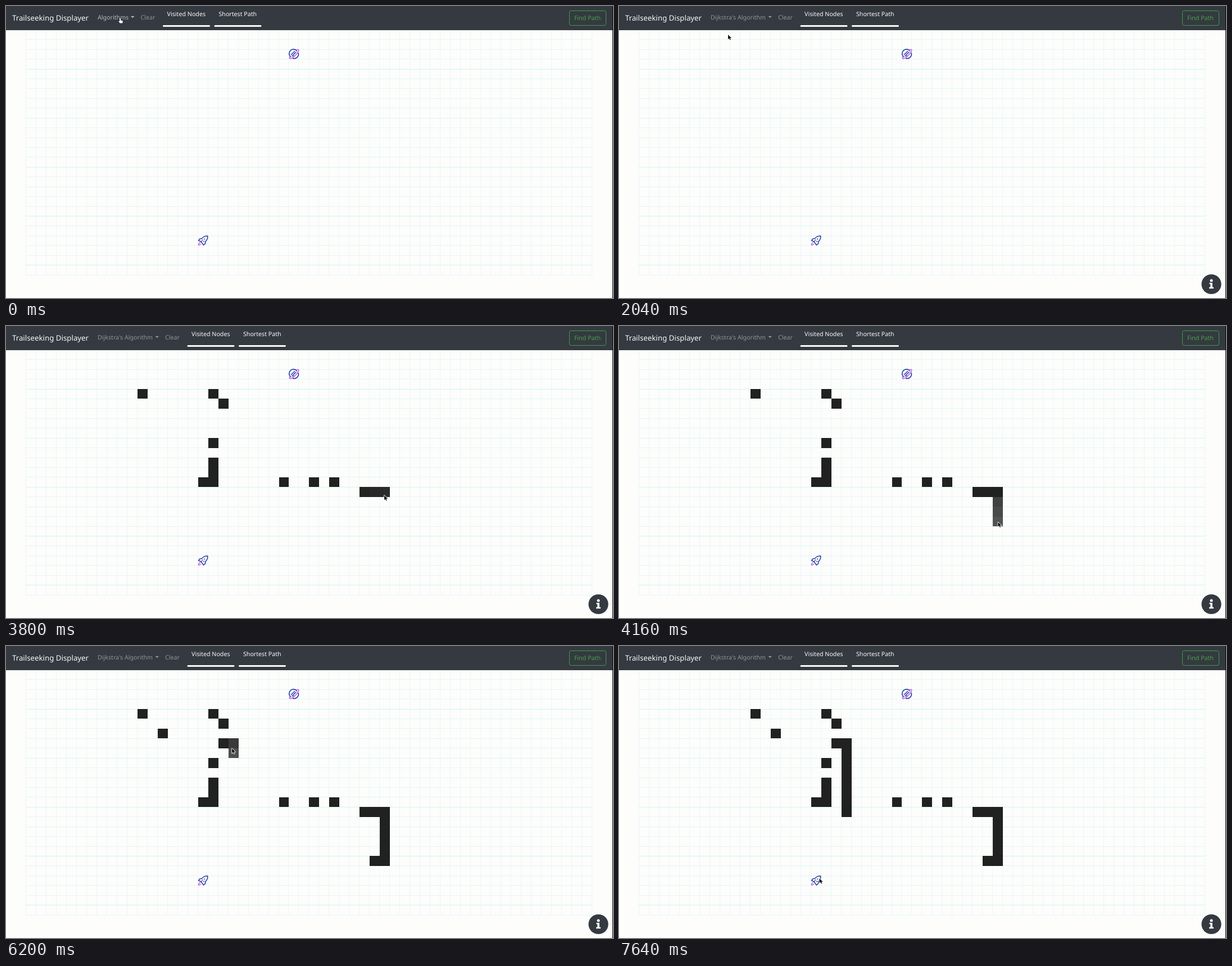
These frames come from a looping animation (1080 by 519 pixels, 8000 ms). An HTML page with a canvas:

```html
<!DOCTYPE html>
<html lang="en">
<head>
<meta charset="utf-8">
<title>Trailseeking Displayer</title>
<style>
  html, body { margin: 0; width: 100%; height: 100%; overflow: hidden; background: #fdfdfc; }
  canvas { display: block; }
</style>
</head>
<body>
<canvas id="stage" width="1080" height="519"></canvas>
<script>
const ctx = document.getElementById('stage').getContext('2d');
const LOOP = 8000;
const FONT = '"Noto Sans", sans-serif';
const COLS = 56, ROWS = 25;
const OPEN = 420, CHOOSE = 1520, INFO = 1640, RELEASE = 4640;
const FADE = 500, GLIDE = 140;
const BLUE = '#2b3fa6', PINK = '#cf5fe6';

const cellX = c => 36 + c * 17.98;
const cellY = r => 42.3 + r * 17.43;
const mix = (a, b, k) => a + (b - a) * k;
const ease = k => k * k * (3 - 2 * k);

// Cells on a straight line, both ends included
function line(c0, r0, c1, r1) {
  const n = Math.max(Math.abs(c1 - c0), Math.abs(r1 - r0));
  return Array.from({ length: n + 1 }, (_, i) => [mix(c0, c1, i / n), mix(r0, r1, i / n)]);
}

// The pointer arrives, draws its cells evenly from start to end, then rests at (x, y)
const moves = [
  { arrive: 0, x: 203, y: 22 },
  { arrive: 1200, x: 194, y: 51 },
  { arrive: 2200, end: 2600, x: 362, y: 250,
    cells: [[11, 4], [18, 4], [19, 5], [18, 9], [18, 11]] },
  { arrive: 3140, end: 3400, x: 673, y: 301,
    cells: [...line(18, 12, 18, 13), [17, 13], [25, 13], [28, 13], [30, 13], ...line(33, 14, 35, 14)] },
  { arrive: 3980, end: 4400, x: 664, y: 380, cells: [...line(35, 15, 35, 19), [34, 19]] },
  { arrive: 4780, x: 288, y: 156 },
  { arrive: 5500, end: 6160, x: 402, y: 182, cells: [[13, 6], [19, 7], [20, 7], [20, 8]] },
  { arrive: 6400, end: 6900, x: 404, y: 295, cells: line(20, 9, 20, 14) },
  { arrive: 7600, x: 356.5, y: 413 }
];

const walls = [], keys = [];
for (const { arrive, end, x, y, cells } of moves) {
  const last = keys[keys.length - 1];
  if (last) keys.push({ ...last, t: arrive - GLIDE });
  if (!cells) {
    keys.push({ x, y, t: arrive });
    continue;
  }
  cells.forEach(([c, r], i) => {
    const t = mix(arrive, end, i / (cells.length - 1));
    walls.push({ c, r, t });
    keys.push({ x: cellX(c + .5), y: cellY(r + .5), t });
  });
  keys.push({ x, y, t: end + 30 });
}

function pointerAt(t) {
  const i = keys.findIndex(p => p.t > t);
  if (i < 1) return keys[keys.length - 1];
  const a = keys[i - 1], b = keys[i];
  const k = ease((t - a.t) / (b.t - a.t));
  return { x: mix(a.x, b.x, k), y: mix(a.y, b.y, k) };
}

function text(s, x, y, color, size = 10.66, align = 'left') {
  ctx.font = `${size}px ${FONT}`;
  ctx.textRendering = 'geometricPrecision';
  ctx.textAlign = align;
  ctx.fillStyle = color;
  ctx.fillText(s, x, y);
}

function rect(x, y, w, h, color) {
  ctx.fillStyle = color;
  ctx.fillRect(x, y, w, h);
}

function round(x, y, w, h, r) {
  ctx.beginPath();
  ctx.roundRect(x, y, w, h, r);
}

function disc(x, y, r, color) {
  ctx.fillStyle = color;
  ctx.beginPath();
  ctx.arc(x, y, r, 0, Math.PI * 2);
  ctx.fill();
}

function stroke(d, color, width) {
  ctx.strokeStyle = color;
  ctx.lineWidth = width;
  ctx.stroke(new Path2D(d));
}

function at(x, y, paint) {
  ctx.save();
  ctx.translate(x, y);
  ctx.lineCap = ctx.lineJoin = 'round';
  paint();
  ctx.restore();
}

function drawGrid() {
  for (let c = 0; c <= COLS; c++) {
    rect(Math.floor(cellX(c) - .5), 43, 1, 435, '#e9f7fb');
  }
  for (let r = 1; r <= ROWS; r++) {
    rect(35, Math.floor(cellY(r)), 1008, 1, r % 5 === 4 ? '#d3f6e6' : '#e3f7f5');
  }
}

function drawWalls(t) {
  for (const { c, r, t: start } of walls) {
    if (t < start) continue;
    const v = Math.round(mix(82, 32, Math.min(1, (t - start) / FADE)));
    const x = Math.round(cellX(c)), y = Math.round(cellY(r));
    rect(x, y, Math.round(cellX(c + 1)) - x, Math.round(cellY(r + 1)) - y, `rgb(${v},${v + 1},${v})`);
  }
}

function drawPlanet() {
  stroke('M5-6A7.8 7.8 0 1 0-6 5M7.6-2A7.8 7.8 0 0 1-2 7.6', BLUE, 1.7);
  stroke('M-5 1L1-5M-3.5 3.5L3.5-3.5M-1 4L0 3', BLUE, 1.6);
  stroke('M5-7.8Q8.8-9.2 8.2-6.2C6.5-1-1 6.5-6 8Q-9 8.8-7.8 5', PINK, 1.6);
}

function drawRocket() {
  stroke('M8.2-8.2C3.5-8.4 .4-6.8-2-3.8L-5.5-3.2L-8-.2L-4.6 1.2L-1.2 4.8L.8 8L4 5.3L4.4 1.6C7.4-1.2 8.6-4.3 8.2-8.2Z', BLUE, 1.6);
  stroke('M-3.4 2L-2.4 1M-1.2-.8L-.8-1.2M1.4 1.6L1.8 1.2M2.4-3L2.8-2.6', BLUE, 1.7);
  stroke('M-5.8 4Q-8 5-8 8Q-5 8-4 6', PINK, 1.5);
}

function drawNav(t) {
  const chosen = t >= CHOOSE;
  const dx = chosen ? 43.5 : 0;
  const label = chosen ? "Dijkstra's Algorithm" : 'Algorithms';
  const color = chosen ? '#8f9397' : t >= OPEN ? '#f2f3f3' : '#b7babd';
  rect(0, 0, 1080, 43, '#343a40');
  text('Trailseeking Displayer', 11, 26, '#f6f6f6', 13.28);
  text(label, 163, 24, color);

  const x = 222 + dx;
  ctx.fillStyle = color;
  ctx.fill(new Path2D(`M${x} 18h6.6l-3.3 3.3z`));

  text('Clear', 239.5 + dx, 24, '#8f9397');
  ['Visited Nodes', 'Shortest Path'].forEach((s, i) => {
    const left = 279 + dx + i * 91.5;
    text(s, left + 41.8, 18, '#fafafa', 10.66, 'center');
    ctx.fillStyle = '#fbfaf8';
    round(left, 34, 84, 3, 1.5);
    ctx.fill();
  });

  ctx.strokeStyle = '#419a45';
  ctx.lineWidth = 1;
  round(1002.5, 8.5, 65, 26, 3);
  ctx.stroke();
  text('Find Path', 1034.5, 25.3, '#48a14b', 10.66, 'center');
}

function drawMenu() {
  ctx.fillStyle = '#fefefe';
  ctx.strokeStyle = '#d9dadb';
  ctx.lineWidth = 1;
  round(158.5, 39.8, 133, 78.7, 3);
  ctx.fill();
  ctx.stroke();
  rect(159, 45.5, 132, 22, '#f6f7f8');
  ["Dijkstra's Algorithm", 'A* Search', 'Breath First Search']
    .forEach((s, i) => text(s, 175.4, 60.2 + i * 22.4, '#26292c'));
}

function drawInfo() {
  disc(0, 0, 17.6, '#343a40');
  disc(0, -6.5, 2.5, '#fff');
  ctx.fillStyle = '#fff';
  ctx.fill(new Path2D('M-3.6-2.5H1.8V5.3H4V7.7H-4V5.3H-1.8V-.2H-3.6Z'));
}

const arrow = new Path2D('M0 0V8.4L2 6.6L3.4 9.6L4.8 9L3.5 6.1H6.2Z');
const hand = new Path2D('M-.8 .6Q.2-.6 1 .6V3.6L4.2 4.2Q5 4.5 4.8 5.6L4.2 8.6H-.2L-2.6 5.4Q-2.8 4.2-.8 5Z');

function drawPointer(shape, fill, edge, width) {
  ctx.strokeStyle = edge;
  ctx.lineWidth = width;
  ctx.stroke(shape);
  ctx.fillStyle = fill;
  ctx.fill(shape);
}

function drawRing() {
  ctx.strokeStyle = '#b5201f';
  ctx.lineWidth = 1.1;
  ctx.beginPath();
  ctx.arc(664, 380, 8.6, 0, Math.PI * 2);
  ctx.stroke();
}

function draw(t) {
  rect(0, 0, 1080, 519, '#fdfdfc');
  drawGrid();
  drawWalls(t);
  at(512.5, 85.5, drawPlanet);
  at(350.5, 417, drawRocket);
  drawNav(t);
  rect(1079, 0, 1, 519, '#050505');
  if (t >= OPEN && t < CHOOSE) drawMenu();
  if (t >= INFO) at(1054, 494.5, drawInfo);
  if (t >= RELEASE && t < RELEASE + 200) drawRing();

  const { x, y } = pointerAt(t);
  at(x, y, () => t < CHOOSE
    ? drawPointer(hand, '#fff', '#222', 1)
    : drawPointer(arrow, '#151515', '#fff', 1.5));
}

function tick() {
  draw(performance.now() % LOOP);
  requestAnimationFrame(tick);
}
tick();
</script>
</body>
</html>
```
